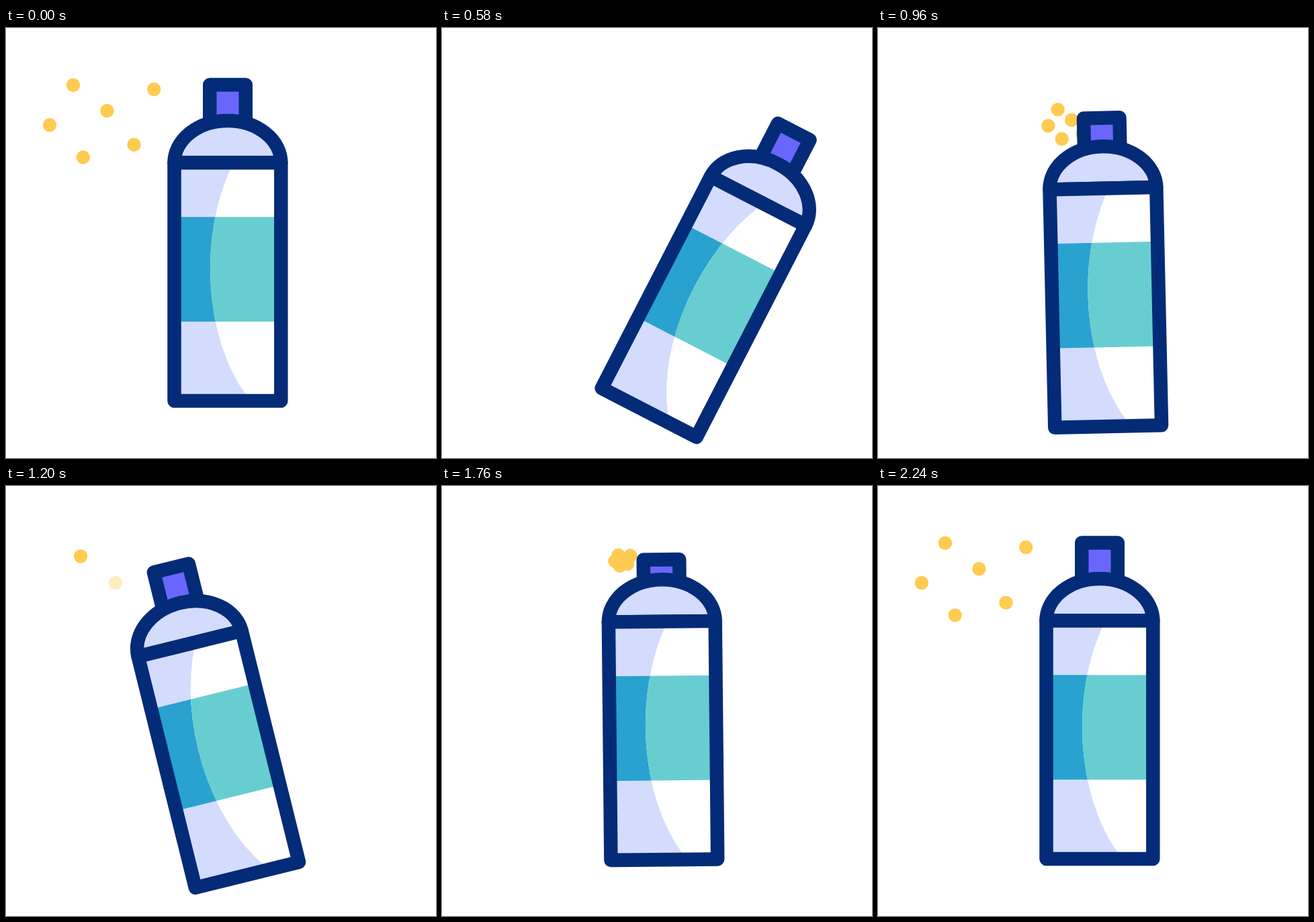
An HTML page for the animation above (2400 ms loop, 640 px wide and 640 px high).

```html
<!DOCTYPE html>
<html lang="en">
<head>
<meta charset="utf-8">
<title>Spray can</title>
<style>
  html, body { margin: 0; width: 100%; height: 100%; overflow: hidden; background: #fff; }
  svg { display: block; width: 100vw; height: 100vh; }
  .line { stroke: #032b77; stroke-width: 20.5; stroke-linejoin: round; }
</style>
</head>
<body>
<svg viewBox="0 0 640 640">
  <defs>
    <clipPath id="shine"><ellipse cx="445" cy="358" rx="141" ry="240"/></clipPath>
  </defs>
  <g id="dots" fill="#ffcb50"></g>
  <g id="can">
    <rect id="nozzle" class="line" x="303.25" y="84.5" width="53.5" height="62" fill="#6b66fb"/>
    <path class="line" d="M250.5 200.5A79.4 62.5 0 0 1 409.3 200.5Z" fill="#d3dcfd"/>
    <path d="M250.5 200.5H409.3V555H250.5Z" fill="#d3dcfd"/>
    <path d="M250.5 281.3H409.3V437H250.5Z" fill="#29a2cf"/>
    <g clip-path="url(#shine)">
      <path d="M250.5 200.5H409.3V555H250.5Z" fill="#fff"/>
      <path d="M250.5 281.3H409.3V437H250.5Z" fill="#68cdd1"/>
    </g>
    <path class="line" d="M250.5 200.5H409.3V555H250.5Z" fill="none"/>
  </g>
</svg>
<script>
const LOOP = 2400, STEP = 20;

// Can poses: time, angle, offset, and how far the path into the pose bows
const poses = [
  { t: 0, a: 0, x: 0, y: 0, bx: 0, by: 0 },
  { t: 520, a: 28, x: 60.7, y: 36.8, bx: 4.4, by: -1.6 },
  { t: 1220, a: -14, x: -13.7, y: 28.9, bx: 0, by: 32.3 },
  { t: 1840, a: 0, x: 0, y: 0, bx: -8, by: 0 }
];
const sprays = [860, 1720], FLIGHT = 520;

// Resting place, drift while fading, fade start after each spray
const dots = [
  { x: 100, y: 85, dx: -72, dy: -20, fade: [400, 1225] },
  { x: 150.4, y: 123.3, dx: -68, dy: 34, fade: [254, 1161] },
  { x: 220.2, y: 91.2, dx: -82, dy: -33, fade: [320, 1050], lift: 0 },
  { x: 65, y: 144.2, dx: -65, dy: -26, fade: [370, 1040] },
  { x: 114.8, y: 192.4, dx: -56, dy: 15, fade: [350, 1100] },
  { x: 190.5, y: 173.8, dx: -62, dy: 34, fade: [300, 1070] }
];
const mid = dots[1];
const nozzleTip = { x: 295, y: 104 };

const $ = id => document.getElementById(id);
const clamp = v => Math.min(1, Math.max(0, v));
const mix = (a, b, p) => a + (b - a) * p;
const part = (t, from, to) => clamp((t - from) / (to - from));
const sine = p => (1 - Math.cos(Math.PI * p)) / 2;
const easeOut = p => 1 - (1 - p) ** 2;

for (const d of dots) {
  d.el = document.createElementNS("http://www.w3.org/2000/svg", "circle");
  d.el.setAttribute("r", 10.2);
  $("dots").append(d.el);
}

function canTransform(t) {
  let i = 1;
  while (i < poses.length - 1 && t >= poses[i].t) i++;
  const p = poses[i - 1], q = poses[i];
  const u = sine(part(t, p.t, q.t)), bow = u * (1 - u);
  const x = 330 + mix(p.x, q.x, u) + q.bx * bow;
  const y = 378 + mix(p.y, q.y, u) + q.by * bow;
  return `translate(${x} ${y}) rotate(${mix(p.a, q.a, u)}) translate(-330 -378)`;
}

function press(t) {
  const push = s => sine(part(t, s - 140, s + 20)) * (1 - sine(part(t, s + 20, s + 170)));
  return 25 * Math.max(...sprays.map(push));
}

function place(d, t) {
  const [first, last] = sprays;
  const fade = start => 1 - clamp((t - start) / 60);
  if (t >= last) {
    const p = easeOut(part(t, last, last + FLIGHT));
    return [mix(nozzleTip.x, d.x, p), mix(nozzleTip.y, d.y, p), 1];
  }
  if (t >= first) {
    const p = easeOut(part(t, first, first + FLIGHT)), k = 1.17 * p;
    const rise = d.lift ?? d.y - mid.y;
    return [369.8 - 235 * p + k * (d.x - mid.x), 132.4 + 13.2 * p + k * rise, fade(d.fade[1])];
  }
  const u = sine(part(t, 0, 520));
  return [d.x + d.dx * u, d.y + d.dy * u, fade(d.fade[0])];
}

function draw(t) {
  const pose = canTransform(t);
  const free = t >= sprays[0] && t < sprays[1];
  $("can").setAttribute("transform", pose);
  $("nozzle").setAttribute("transform", `translate(0 ${press(t)})`);
  $("dots").setAttribute("transform", free ? "translate(0 0)" : pose);
  for (const d of dots) {
    const [x, y, o] = place(d, t);
    d.el.setAttribute("cx", x);
    d.el.setAttribute("cy", y);
    d.el.setAttribute("opacity", o);
  }
}

const start = performance.now();
function tick() {
  const t = (performance.now() - start) % LOOP;
  draw(Math.floor(t / STEP) * STEP);
  requestAnimationFrame(tick);
}
tick();
</script>
</body>
</html>
```
